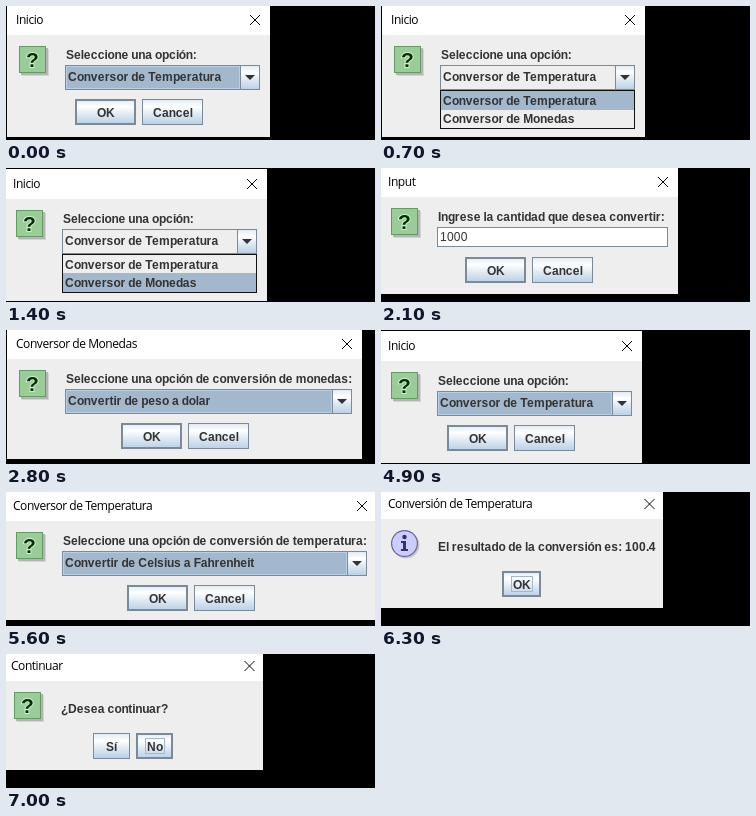
An HTML page with a canvas that plays this animation: 369x134 px, repeating every 7700 ms.

```html
<!DOCTYPE html>
<html lang="es">
<head>
<meta charset="utf-8">
<title>Conversor</title>
<style>
html, body { margin: 0; width: 100%; height: 100%; overflow: hidden; background: #000; }
canvas { display: block; }
</style>
</head>
<body>
<canvas id="stage" width="369" height="134"></canvas>
<script>
const ctx = document.getElementById('stage').getContext('2d');
const STEP = 700;
const BOLD = 'bold 12px "Liberation Sans", Arial, sans-serif';
const PLAIN = '12px "Liberation Sans", Arial, sans-serif';
const TITLE = '12px "Open Sans", "Segoe UI", sans-serif';
const BORDER = '#7a8a99', SELECT = '#a3b8cc', INK = '#333';
const MENU = ['Conversor de Temperatura', 'Conversor de Monedas'];
const OK_CANCEL = ['OK', 'Cancel'], YES_NO = ['Sí', 'No'];

function box(x, y, w, h, fill) {
  ctx.fillStyle = fill;
  ctx.fillRect(x, y, w, h);
}

function frame(x, y, w, h, color = BORDER) {
  ctx.strokeStyle = color;
  ctx.lineWidth = 1;
  ctx.strokeRect(x + .5, y + .5, w - 1, h - 1);
}

// Desktop-style text: whole-pixel advances, on a slightly reduced screen.
const advance = c => Math.round(ctx.measureText(c).width) * .99;

function textWidth(s) {
  ctx.font = BOLD;
  return [...s].reduce((sum, c) => sum + advance(c), 0);
}

function text(s, x, y, font = BOLD) {
  ctx.font = font;
  ctx.fillStyle = INK;
  for (const c of s) {
    ctx.fillText(c, x, y);
    x += advance(c);
  }
}

function shaded(x, y, w, h) {
  const g = ctx.createLinearGradient(0, y, 0, y + h);
  g.addColorStop(0, '#dde8f3');
  g.addColorStop(.3, '#fff');
  g.addColorStop(.6, '#dde8f3');
  g.addColorStop(1, '#b8cfe5');
  box(x, y, w, h, g);
  frame(x, y, w, h);
}

function button(label, x, y, w, isDefault, focused) {
  const h = 26, tw = Math.round(textWidth(label)), tx = x + Math.round((w - tw) / 2);
  shaded(x, y, w, h);
  if (isDefault) frame(x + 1, y + 1, w - 2, h - 2);
  if (focused) frame(tx - 2, y + 5, tw + 4, 16, SELECT);
  text(label, tx, y + 18);
}

function buttons(labels, center, y, w, focus) {
  const gap = 6, total = labels.length * (w + gap) - gap;
  const x = Math.round(center - total / 2);
  labels.forEach((label, i) =>
    button(label, x + i * (w + gap), y, w, focus < 0 ? i === 0 : i === focus, i === focus));
}

function questionIcon(x, y) {
  box(x + 3, y + 3, 27, 27, '#d4d4d4');
  box(x + 2, y + 2, 27, 27, '#b4b4b4');
  box(x, y, 27, 27, '#99cc99');
  frame(x, y, 27, 27, '#669966');
  ctx.font = 'bold 21px "Liberation Sans", Arial, sans-serif';
  ctx.textAlign = 'center';
  ctx.lineWidth = 2;
  ctx.strokeStyle = '#d5ecd5';
  ctx.strokeText('?', x + 13.5, y + 21);
  ctx.fillStyle = '#003300';
  ctx.fillText('?', x + 13.5, y + 21);
  ctx.textAlign = 'left';
}

function disc(x, y, r, fill) {
  ctx.beginPath();
  ctx.arc(x, y, r, 0, 7);
  ctx.fillStyle = fill;
  ctx.fill();
}

function infoIcon(x, y) {
  disc(x + 15, y + 15, 13.5, '#c8c8c8');
  disc(x + 13.5, y + 13.5, 13.5, '#666699');
  disc(x + 13.5, y + 13.5, 12.3, '#ccccff');
  const ink = '#333366';
  disc(x + 13.5, y + 7, 2.2, ink);
  box(x + 10, y + 11, 5, 2, ink);
  box(x + 12, y + 11, 3, 9, ink);
  box(x + 10, y + 19, 7, 2, ink);
}

function combo(x, y, right, value, open) {
  const w = right - x, h = 25;
  box(x, y, w, h, open ? '#eee' : SELECT);
  frame(x, y, w, h);
  shaded(right - 20, y, 20, h);
  if (!open) frame(x + 1, y + 1, w - 21, h - 2, '#b8cfe5');
  ctx.beginPath();
  ctx.moveTo(right - 15, y + 10);
  ctx.lineTo(right - 5, y + 10);
  ctx.lineTo(right - 10, y + 15);
  ctx.fillStyle = INK;
  ctx.fill();
  text(value, x + 3, y + 16);
}

function popup(x, y, w, active) {
  box(x, y, w, 39, '#eee');
  MENU.forEach((item, i) => {
    if (i === active) box(x + 1, y + 1 + i * 18, w - 2, 19, SELECT);
    text(item, x + 3, y + 15 + i * 18);
  });
  frame(x, y, w, 39, '#111');
}

function titleBar({ title, dx, dy, right, message }) {
  ctx.font = TITLE;
  ctx.letterSpacing = '-0.45px';
  ctx.fillStyle = '#000';
  ctx.fillText(title, 10 + dx, 18 + dy);
  ctx.letterSpacing = '0px';

  const cx = right - (message ? 13.5 : 15), cy = 14 + dy;
  ctx.beginPath();
  ctx.moveTo(cx - 5, cy - 5);
  ctx.lineTo(cx + 5, cy + 5);
  ctx.moveTo(cx + 5, cy - 5);
  ctx.lineTo(cx - 5, cy + 5);
  ctx.strokeStyle = '#000';
  ctx.lineWidth = 1;
  ctx.stroke();
}

function dialog(d) {
  const { dx, dy, right, bottom } = d;
  const left = Math.max(0, 1 + dx), top = Math.max(0, dy - 1);
  const center = (2 + dx + right) / 2;
  box(left, top, right - left, bottom - top, '#eee');
  box(left, top, right - left, 29 + dy - top, '#fff');
  titleBar(d);
  (d.info ? infoIcon : questionIcon)(13 + dx, 40 + dy);

  if (d.message) {
    text(d.message, 60 + dx, 61 + dy);
    buttons(d.labels, center, 81 + dy, d.labels.length > 1 ? 37 : 39, d.focus);
    return;
  }

  const x = 59 + dx, y = 59 + dy, edge = right - 10;
  text(d.prompt, x + 1, 53 + dy);
  if (d.input) {
    box(x, y, edge - x, 20, '#fff');
    frame(x, y, edge - x, 20);
    text(d.input, x + 3, y + 14, PLAIN);
    buttons(OK_CANCEL, center, 89 + dy, 61, -1);
    return;
  }
  const open = d.active !== undefined;
  combo(x, y, edge, d.value, open);
  buttons(OK_CANCEL, center, 93 + dy, 61, -1);
  if (open) popup(x, y + 25, edge - x, d.active);
}

const start = { title: 'Inicio', prompt: 'Seleccione una opción:', value: MENU[0],
                dx: 0, dy: 0, right: 264, bottom: 131 };
const startLow = { ...start, dx: -3, dy: 2, right: 261, bottom: 133 };
const result = { info: true, labels: ['OK'], focus: 0, dx: -3 };
const again = { title: 'Continuar', message: '¿Desea continuar?', labels: YES_NO };

const scenes = [
  start,
  { ...start, active: 0 },
  { ...startLow, active: 1 },
  { title: 'Input', prompt: 'Ingrese la cantidad que desea convertir:', input: '1000',
    dx: -3, dy: 0, right: 297, bottom: 126 },
  { title: MENU[1], prompt: 'Seleccione una opción de conversión de monedas:',
    value: 'Convertir de peso a dolar', dx: 0, dy: 0, right: 356, bottom: 129 },
  { ...result, title: 'Conversión de Monedas', message: 'El resultado de la conversión es: 1.1',
    dy: -1, right: 268, bottom: 117 },
  { ...again, focus: 0, dx: -4, dy: 3, right: 258, bottom: 121 },
  startLow,
  { title: MENU[0], prompt: 'Seleccione una opción de conversión de temperatura:',
    value: 'Convertir de Celsius a Fahrenheit', dx: -3, dy: 0, right: 371, bottom: 128 },
  { ...result, title: 'Conversión de Temperatura', message: 'El resultado de la conversión es: 100.4',
    dy: -2, right: 282, bottom: 116 },
  { ...again, focus: 1, dx: -5, dy: -2, right: 257, bottom: 116 }
];

const origin = performance.now();

function draw() {
  const t = Math.max(0, performance.now() - origin);
  box(0, 0, 369, 134, '#000');
  dialog(scenes[Math.floor(t / STEP) % scenes.length]);
  requestAnimationFrame(draw);
}
draw();
</script>
</body>
</html>
```
